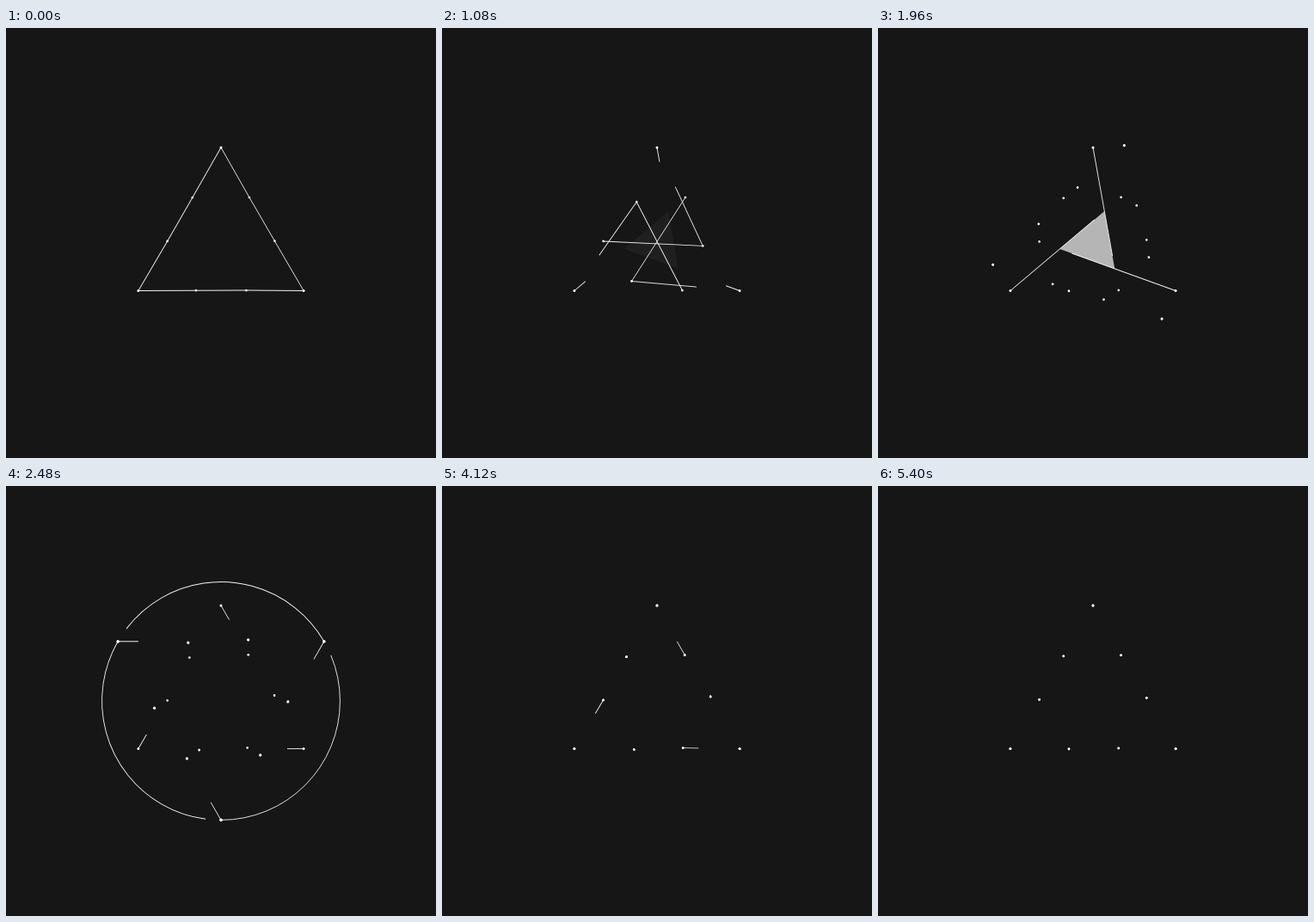
Animation of 500 by 500 pixels, one loop 5.68 s. Source, as an HTML page with a canvas:

```html
<!DOCTYPE html>
<html lang="en">
<head>
<meta charset="utf-8">
<title>Triangle lines</title>
<style>
html, body { margin: 0; height: 100%; overflow: hidden; background: #161616; }
canvas { display: block; }
</style>
</head>
<body>
<canvas id="stage" width="500" height="500"></canvas>
<script>
const ctx = document.getElementById('stage').getContext('2d');
const LOOP = 5680, STEP = 40, END = 5400;
const VERTEX = 111, INNER = 62.4;
const rad = deg => deg * Math.PI / 180;
const polar = (r, deg) => [r * Math.cos(rad(deg)), r * Math.sin(rad(deg))];
const mix = (a, b, p) => [a[0] + (b[0] - a[0]) * p, a[1] + (b[1] - a[1]) * p];

// Sine ease from 0 to 1 between two times.
const ease = (t, from, to) => {
  const u = Math.min(1, Math.max(0, (t - from) / (to - from)));
  return (1 - Math.cos(Math.PI * u)) / 2;
};
// Grows between a and b, draws back between c and d.
const pulse = (t, a, b, c, d) => ease(t, a, b) - ease(t, c, d);

function line(a, b, p) {
  if (p < 0.002) return;
  ctx.beginPath();
  ctx.moveTo(...a);
  ctx.lineTo(...mix(a, b, p));
  ctx.stroke();
}

function arc(r, deg, p) {
  if (p < 0.002) return;
  ctx.beginPath();
  ctx.arc(0, 0, r, rad(deg), rad(deg - 120 * p), true);
  ctx.stroke();
}

function dot([x, y], r) {
  ctx.beginPath();
  ctx.arc(x, y, r, 0, 2 * Math.PI);
  ctx.fill();
}

// Fills the triangle enclosed by the line a-b and its two rotations.
function core(a, b, p) {
  if (p < 0.002) return;
  const len = Math.hypot(b[0] - a[0], b[1] - a[1]);
  const u = [(b[0] - a[0]) / len, (b[1] - a[1]) / len];
  const along = a[0] * u[0] + a[1] * u[1];
  const foot = [a[0] - along * u[0], a[1] - along * u[1]];
  const reach = 2 * Math.hypot(...foot);
  const deg = Math.atan2(foot[1], foot[0]) * 180 / Math.PI + 60;
  ctx.globalAlpha = p ** 1.4;
  ctx.beginPath();
  for (let i = 0; i < 3; i++) ctx.lineTo(...polar(reach, deg + i * 120));
  ctx.fill();
  ctx.globalAlpha = 1;
}

function threefold(draw) {
  for (let i = 0; i < 3; i++) {
    ctx.save();
    ctx.rotate(rad(120 * i));
    draw();
    ctx.restore();
  }
}

function render(t) {
  ctx.setTransform(1, 0, 0, 1, 0, 0);
  ctx.fillStyle = '#161616';
  ctx.fillRect(0, 0, 500, 500);
  ctx.translate(250, 250);
  ctx.fillStyle = '#fff';
  ctx.strokeStyle = '#f2f2f2';
  ctx.lineWidth = 0.9;

  const twist = ease(t, 1700, 2410) - 0.7 * ease(t, 3720, 4500);
  const pDeg = -58.1 - 1.3 * twist, qDeg = -2.2 - 3.8 * twist;
  const v = polar(VERTEX, -90), vNext = polar(VERTEX, 30);
  const p = polar(INNER, pDeg), pNext = polar(INNER, pDeg + 120);
  const q = [0, 120, 240].map(d => polar(INNER, qDeg + d));
  const first = ease(t, 150, 900), second = ease(t, 937, 1637);
  const rover = second > 0 ? mix(q[1], q[2], second) : mix(q[0], q[1], first);

  const toP = pulse(t, 889, 1820, 1820, 2250);
  const toQ = pulse(t, 4380, 4900, 4900, 5200);
  core(v, pNext, toP);
  core(v, q[1], toQ);

  const outerSide = pulse(t, 2378, 2878, 2880, 3300);
  const side = outerSide + pulse(t, 4560, 5060, 5060, 5390);
  const spoke = pulse(t, 3380, 3880, 3880, 4250);

  threefold(() => {
    line(v, p, 1 - ease(t, 0, 520));
    line(p, rover, 1 - ease(t, 1340, 1790));
    line(rover, vNext, 1 - ease(t, 884, 1334));
    line(v, pNext, toP);
    line(v, q[1], toQ);
    line(v, vNext, side);
    line(p, v, spoke);
    arc(INNER, qDeg, pulse(t, 3251, 3711, 3750, 4150));
    arc(VERTEX, -90, pulse(t, 4105, 4460, 4460, 4630));
    dot(v, 1.5);
    dot(p, 1.35);
    dot(rover, 1.35);
  });

  // The second set of points spirals out and back.
  if (t <= 1700) return;
  const spread = pulse(t, 1700, 2410, 3000, 3720);
  const scale = 1 + 0.247 * spread;
  ctx.rotate(rad(60 * spread));
  ctx.scale(scale, scale);
  ctx.lineWidth = 0.9 / scale;
  threefold(() => {
    arc(VERTEX, -90, pulse(t, 1976, 2576, 2580, 3020));
    if (spread > 0) {
      line(v, vNext, outerSide);
      line(p, v, spoke);
    }
    dot(v, 1.45);
    dot(p, 1.3);
    dot(q[0], 1.3);
  });
}

function frame() {
  const t = performance.now() % LOOP;
  render(Math.min(END, Math.floor(t / STEP) * STEP));
  requestAnimationFrame(frame);
}
frame();
</script>
</body>
</html>
```
